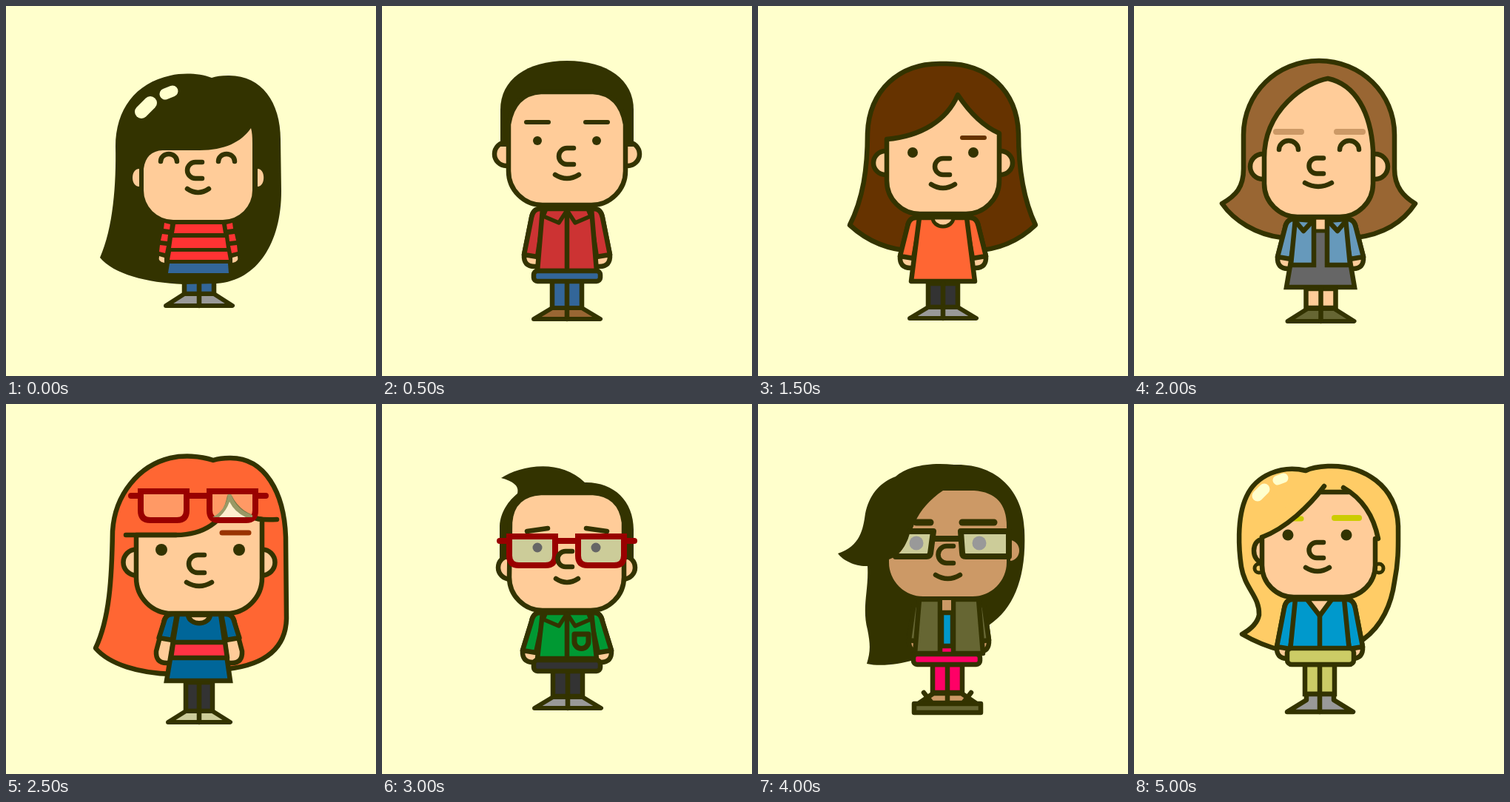
An HTML page that plays this animation: 500 px wide and 500 px high, repeating every 5.5 s.

```html
<!DOCTYPE html>
<html lang="en">
<head>
<meta charset="utf-8">
<title>Little people</title>
<style>
html, body { margin: 0; width: 100%; height: 100%; overflow: hidden; background: #ffc; }
svg { display: block; width: 100vw; height: 100vh; }
</style>
</head>
<body>
<svg id="stage" viewBox="0 0 500 500" stroke-linecap="round" stroke-linejoin="round"></svg>
<script>
const INK = '#330', SKIN = '#fc9', CREAM = '#ffc', W = 6.5;

// Basic marks: outlined shape, flat shape, open line, dot
const shape = (d, fill, w = W, extra = '') => `<path d="${d}" fill="${fill}" stroke="${INK}" stroke-width="${w}" ${extra}/>`;
const flat = (d, fill = INK) => `<path d="${d}" fill="${fill}"/>`;
const line = (d, w = W, color = INK) => `<path d="${d}" fill="none" stroke="${color}" stroke-width="${w}"/>`;
const dot = (x, y, r, fill = INK) => `<circle cx="${x}" cy="${y}" r="${r}" fill="${fill}"/>`;
const mirror = (c, art) => `${art}<g transform="matrix(-1 0 0 1 ${2 * c} 0)">${art}</g>`;
const box = (l, t, r, b) => `M${l} ${t}H${r}V${b}H${l}Z`;
const sharp = 'stroke-linejoin="miter"';

// Face parts
const jaw = (l, b, r) => `V${b - r}a${r} ${r} 0 0 1 ${-r} ${r}H${l + r}a${r} ${r} 0 0 1 ${-r} ${-r}`;
const nose = (x, y, r = 11) => line(`M${x} ${y}h-9a${r} ${r} 0 0 0 0 ${2 * r}h9`);
const smile = (x, y, w = 32) => line(`M${x} ${y}q${w / 2} 10 ${w} 0`);
const happy = (x, y, r) => line(`M${x - r} ${y}a${r} ${r - 1} 0 0 1 ${2 * r} 0`);
const ears = (c, dx, y, r, fill = SKIN) =>
  mirror(c, `<circle cx="${c - dx}" cy="${y}" r="${r}" fill="${fill}" stroke="${INK}" stroke-width="${W}"/>`);
const brow = (l, r, y, w = 6, color = INK) => line(`M${l} ${y}H${r}`, w, color);

// Body parts
function arms(c, y, h, w, fill, skin = SKIN, sleeve = h - 16) {
  const top = `M${c - 36} ${y}Q${c - 46} ${y} ${c - 48} ${y + 12}L`;
  const part = s => `${c - w + (h - 16 - s) * .2} ${y + s}`;
  return mirror(c,
    shape(`${top}${part(h - 16)}Q${c - w - 1} ${y + h} ${c - w + 14} ${y + h}L${c - 30} ${y + h}V${y}Z`, skin) +
    shape(`${top}${part(sleeve)}l18 3L${c - 30} ${y}Z`, fill));
}
const torso = (c, y, b, fill, top = 33, bottom = 40) =>
  shape(`M${c - top} ${y}L${c - bottom} ${b}H${c + bottom}L${c + top} ${y}Z`, fill);
const band = (c, hw, t, b, fill, r = 5) =>
  `<rect x="${c - hw}" y="${t}" width="${2 * hw}" height="${b - t}" rx="${r}" fill="${fill}" stroke="${INK}" stroke-width="${W}"/>`;
const legs = (c, hw, t, b, fill) => shape(box(c - hw, t, c + hw, b), fill, W, sharp) + line(`M${c} ${t}V${b}`);
const shoes = (c, hw, t, b, fill, half = 45) =>
  shape(`M${c - half} ${b}L${c - hw} ${t}H${c + hw}L${c + half} ${b}Z`, fill, 6) + line(`M${c} ${t}V${b}`);
const collar = (c, y) => mirror(c, line(`M${c} ${y + 2}l-11 17-21-9 4-10`, 5.5));

function glasses(l1, r1, l2, r2, t, b, from, to, bar, color, lens, opacity) {
  const one = (l, r) =>
    `<path d="M${l} ${t}H${r}V${b - 13}Q${r} ${b} ${r - 13} ${b}H${l + 13}Q${l} ${b} ${l} ${b - 13}Z" fill="${lens}"
      fill-opacity="${opacity}" stroke="${color}" stroke-width="8" stroke-linejoin="miter"/>`;
  return one(l1, r1) + one(l2, r2) + line(`M${from} ${bar}H${l1}M${r1} ${bar}H${l2}M${r2} ${bar}H${to}`, 8, color);
}

const stripedGirl = () =>
  legs(261, 20, 364, 389, '#369') + shoes(261, 20, 389, 405, '#999') +
  flat('M278 97C262 91 240 90 222 94C175 104 148 140 148 190C149 240 145 300 127 340C145 362 190 374 240 376L285 375C340 371 372 320 372 250L371 180C371 130 345 93 300 94Q286 94 278 97Z') +
  flat('M180 220C168 220 168 244 180 244ZM340 220C351 220 351 244 340 244Z', SKIN) +
  flat(`M186 220Q189 196 212 195H262C295 195 318 184 331 165Q333 172 333 185${jaw(186, 289, 40)}Z`, SKIN) +
  line('M183 143L195 131', 18, CREAM) + line('M215 119L225 115', 15, CREAM) +
  happy(220, 210, 11) + happy(298, 210, 11) + nose(265, 211) + smile(245, 247, 29) +
  flat('M229 295H292L294 307H227ZM225 313H296L298 327H223ZM223 332H299L301 343H221Z', '#f33') +
  flat('M221 348H300L301 361H219Z', '#369') +
  mirror(260, flat('M214 293L222 295 221 302 213 301ZM211 308L219 309 218 318 209 317ZM208 323L217 324 215 334 207 332Z', '#f33') +
    flat('M207 338L214 340V347Q205 346 207 338Z', SKIN));

const beardedMan = () =>
  ears(250, 82, 200, 16) +
  flat('M160 190V140C160 100 195 74 250 74C305 74 340 100 340 140V190Z') +
  shape(`M171 160Q178 118 215 116H285Q322 118 329 160${jaw(171, 269, 46)}Z`, SKIN) +
  brow(195, 225, 157) + brow(275, 305, 157) + dot(210, 182, 6) + dot(290, 182, 6) +
  nose(259, 192) + smile(234, 228) +
  arms(250, 274, 78, 58, '#c33') + torso(250, 274, 358, '#c33') + collar(250, 274) +
  line('M250 278V354') + legs(250, 20, 366, 409, '#369') + band(250, 45, 358, 372, '#369') +
  shoes(250, 20, 408, 423, '#963');

const manWithCup = () =>
  ears(240.5, 83.5, 205, 16) +
  flat('M148 190V117C148 75 190 52 228 50C245 44 255 44 265 44C305 46 333 77 333 117V190Z') +
  shape(`M160 167Q167 162 167 152V101C185 82 200 84 225 84C250 79 265 78 275 79C292 80 305 92 312 103V155Q313 165 320 167${jaw(160, 277, 49)}Z`, SKIN) +
  brow(189, 222, 151) + brow(257, 291, 151) + dot(204, 177, 4) + dot(274, 177, 4) +
  line('M226 198V209a12.5 12.5 0 0 0 25 0V198', 6) + smile(223, 235, 35) +
  shape(box(222, 278, 259, 294), SKIN, 5) +
  arms(241, 292, 84, 54, '#fff') + torso(241, 292, 370, '#fff', 32, 37) +
  shape('M232 292L241 317 249 292Z', SKIN, 5) + line('M241 317V366', 5) +
  mirror(241, line('M232 293L225 311 216 304 212 294', 5.5)) +
  legs(241, 16, 386, 438, '#093') + band(241, 41, 372, 388, '#093') + shoes(241, 16, 438, 453, '#f93', 46) +
  shape('M314 403L318 453H354L357 403Z', '#9c3', 6, sharp) +
  shape(box(311, 389, 359, 403), '#9c3', 6, sharp) +
  `<path d="M323 368L335 376V389" fill="none" stroke="${INK}" stroke-width="6" stroke-linecap="butt"/>`;

const wavyWoman = () =>
  shape('M250 78C190 76 150 115 148 172C148 220 142 260 124 296C150 320 180 330 210 331H290C320 330 350 320 375 296C358 260 352 220 352 172C350 115 310 76 250 78Z', '#630') +
  ears(250, 78, 212, 16) +
  shape(`M174 180C220 176 255 155 270 120C290 150 310 165 326 172${jaw(174, 281, 45)}Z`, SKIN) +
  brow(276, 306, 178, 6, '#630') +
  dot(209, 198, 7) + dot(291, 198, 7) + nose(259, 206) + smile(234, 241) +
  arms(250, 286, 68, 58, '#f63') + torso(250, 286, 372, '#f63', 32, 43) +
  shape('M236 286a14 12 0 0 0 28 0Z', SKIN, 5) +
  legs(250, 20, 375, 407, '#333') + shoes(250, 20, 407, 422, '#999');

const denimWoman = () =>
  shape('M148 174C148 118 193 74 250 74C307 74 352 118 352 174V220C352 245 365 258 380 267C365 290 340 308 300 313H200C165 309 135 290 119 267C138 256 148 245 148 220Z', '#963') +
  ears(250, 76, 217, 17) +
  shape(`M262 98C300 106 320 145 323 195${jaw(176, 285, 45)}V205C176 140 232 103 262 98Z`, SKIN) +
  brow(192, 226, 170, 8, '#c96') + brow(274, 309, 170, 8, '#c96') +
  happy(209, 194, 13) + happy(291, 194, 13) + nose(256, 205.5, 10.5) + smile(231, 239, 36) +
  arms(252, 288, 67, 58, '#69b') +
  shape('M212 345L206 380H298L292 345Z', '#666', W, sharp) + flat(box(242, 290, 262, 353), '#666') +
  flat(box(245, 289, 259, 304), SKIN) + line('M245 304H259', 5) +
  mirror(252, shape('M218 288L212 350H243V290Z', '#69b', W, sharp) + line('M219 292L229 304 241 291')) +
  legs(252.5, 20, 382, 408, SKIN) + shoes(252.5, 18, 409, 426, '#663');

const redhead = () =>
  legs(261, 18, 376, 415, '#333') + shoes(261, 18, 415, 430, '#cc9', 42) +
  shape('M280 76C262 70 240 69 222 73C180 83 147 122 144 172C143 235 140 290 121 330C140 352 180 364 225 365L300 358C350 352 378 330 379 290L378 180C376 120 350 72 302 73Q290 73 280 76Z', '#f63') +
  ears(261, 85, 214, 17.5) +
  shape(`M176 177H230C265 177 296 160 302 125C312 145 328 154 346 156${jaw(176, 283, 48)}Z`, SKIN) +
  line('M162 177H230M340 155Q350 157 366 156') +
  brow(292, 328, 174, 7, '#930') + dot(210, 197, 8) + dot(315, 197, 8) +
  nose(268, 204, 12) + smile(244, 241, 34) +
  glasses(182, 244, 275, 337, 118, 157, 169, 351, 124, '#900', CREAM, .33) +
  flat('M279 153Q297 144 300 122H304Q312 144 333 150V153Z', '#996') +
  flat('M288 153Q298 144 302 132Q309 146 324 153Z', '#ffefd0') +
  arms(261, 284, 66, 58, '#069', SKIN, 32) +
  shape('M232 284L217 374H303L290 284Z', '#069', W, sharp) +
  shape('M226 322H296L299 343H223Z', '#f34') +
  shape('M246 285C248 300 274 300 276 285Z', SKIN);

const quiffMan = () =>
  ears(249.5, 77, 221, 15.5) +
  flat('M161 100C185 84 240 72 274 106C312 105 340 130 340 170V210H159V165C160 145 172 130 183 121C186 110 176 104 161 100Z') +
  shape(`M173 160Q176 122 215 120H285Q322 122 327 160${jaw(172, 279, 45)}Z`, SKIN) +
  line('M196 172L224 168M276 168L304 172') +
  glasses(172, 234, 265, 327, 179, 218, 159, 341, 185, '#900', '#cc9', 1) +
  dot(210, 194, 6.5, '#666') + dot(289, 194, 6.5, '#666') +
  nose(257, 199, 10.5) + smile(235, 236, 30) +
  arms(250, 282, 67, 60, '#093') + torso(250, 282, 344, '#093') +
  collar(250, 281) + line('M250 285V342') +
  shape('M260 311H279V321a9.5 9.5 0 0 1-19 0Z', '#093', 7) +
  legs(251, 20, 360, 395, '#333') + band(250, 45, 346, 361, '#333') + shoes(251, 20, 396, 411, '#999');

const tallMan = () =>
  ears(250, 77, 200, 16) +
  flat('M162 190V120C164 80 200 54 252 54C305 56 338 84 338 124V190Z') +
  shape(`M172 165V125Q190 94 230 96C265 96 300 92 328 125${jaw(172, 276, 46)}Z`, SKIN) +
  brow(196, 225, 154) + brow(275, 304, 154) + dot(210, 178, 6) + dot(290, 178, 6) +
  nose(259, 192) + smile(234, 233) +
  arms(250, 284, 82, 58, '#069') + torso(250, 284, 368, '#069') +
  shape('M234 284L250 304 266 284Z', SKIN, 5) +
  legs(250, 20, 380, 429, '#663') + band(250, 44, 368, 384, '#663') + shoes(250, 20, 428, 443, '#963');

const spectacledGirl = () =>
  flat('M186 98C200 85 230 78 265 82C320 80 358 115 360 170C363 230 348 275 312 299L300 330 210 346C190 352 165 355 147 351C152 335 152 325 148 305C140 275 150 250 148 219C133 220 115 212 108 202C138 192 142 170 145 148C150 125 162 107 186 98Z') +
  flat('M341 184C357 186 357 210 341 212Z', '#c96') +
  flat(`M250 117H292Q336 120 336 165${jaw(177, 260, 46)}V210C198 203 204 180 212 160C220 143 232 129 250 117Z`, '#c96') +
  brow(214, 233, 160, 9) + brow(276, 319, 160, 9) +
  flat('M206 172H237L232 207H186Q200 195 206 172Z', '#cc9') +
  dot(214, 188, 9.5, '#999') +
  line('M206 172H237L233 202Q232 206 228 206H186M237 182H275', 8) +
  shape('M274 172H339V206H281Q276 206 276 201Z', '#cc9', 8) + dot(299, 188, 9.5, '#999') +
  nose(264, 192, 11.5) + smile(240, 231, 33) +
  arms(258, 264, 71, 54, '#663', '#c96') + torso(258, 264, 337, '#663', 40, 46) +
  shape(box(246, 264, 264, 340), '#f06') +
  flat(box(249, 265, 261, 279), '#c96') + shape(box(248, 282, 263, 327), '#09c') +
  legs(256, 20, 352, 390, '#f06') + band(255, 45, 338, 352, '#f06') +
  shape('M218 404L237 391H275L294 404Z', '#c96') +
  line('M224 390L235 404M288 390L277 404M256 390V404') +
  shape(box(211, 405, 301, 417), '#663');

const bobGirl = () =>
  legs(250, 20, 366, 399, '#333') + shoes(250, 20, 399, 414, '#999') +
  shape('M222 91C262 80 315 90 338 130C358 165 350 205 352 245C354 280 360 305 370 330C345 352 310 360 270 361H215C165 356 130 318 130 250L131 180C133 125 170 86 222 91Z', '#963') +
  ears(248, 78, 213, 16) +
  shape(`M171 168C185 188 215 192 250 192H325${jaw(171, 278, 45)}Z`, SKIN) +
  happy(209, 212, 11) + happy(288, 212, 11) + nose(256, 212) + smile(232, 248) +
  arms(250, 280, 66, 58, '#fc3') + torso(250, 280, 366, '#fc3', 31, 43) +
  shape('M236 280a14 12 0 0 0 28 0Z', SKIN, 5);

const blonde = () => {
  const cheeks = jaw(173, 261, 43);
  return shape('M232 90C200 82 165 96 152 125C138 155 142 200 145 220C150 250 170 260 169 285Q166 300 146 311C165 322 180 328 200 333L310 318C335 300 348 270 352 240C358 210 357 190 357 165C355 110 310 82 262 84Q242 85 232 90Z', '#fc6') +
    shape('M174 183C158 183 158 213 174 214Z', SKIN) +
    mirror(250, shape('M175 222a6 6 0 1 1-12 0a6 6 0 1 1 12 0Z', '#fc6', 5)) +
    flat(`M173 180C205 168 230 145 252 119H290C310 135 322 155 326 182${cheeks}Z`, SKIN) +
    brow(213, 226, 155, 7, '#cc0') + brow(271, 304, 154, 8, '#cc0') +
    flat('M174 178C199 168 224 152 242 126L215 126Z', '#fc6') +
    line(`M252 119H290M326 182${cheeks}V180`) +
    line('M173 180C205 168 237 138 257 111M283 113C309 128 324 152 330 182') +
    line('M167 124L176 115', 15, CREAM) + line('M194 103L202 100', 13, CREAM) +
    dot(208, 177, 7.5) + dot(287, 177, 7.5) + nose(256, 187, 10.5) + smile(232, 221) +
    arms(251, 264, 80, 58, '#09c') + torso(251, 264, 334, '#09c') +
    shape('M233 263L251 286 268 263Z', SKIN) + line('M251 286V328') +
    legs(251, 20, 352, 392, '#cc6') + band(252, 45, 330, 352, '#cc6', 6) +
    shape('M207 416L233 400V392H270V400L296 416Z', '#999') + line('M251 392V416');
};

const STEP = 500;
const cast = [stripedGirl, beardedMan, manWithCup, wavyWoman, denimWoman, redhead,
  quiffMan, tallMan, spectacledGirl, bobGirl, blonde].map(draw => draw());
const stage = document.getElementById('stage');
let shown = -1;

function tick() {
  const next = Math.floor(performance.now() / STEP) % cast.length;
  if (next !== shown) stage.innerHTML = cast[shown = next];
  requestAnimationFrame(tick);
}
tick();
</script>
</body>
</html>
```
